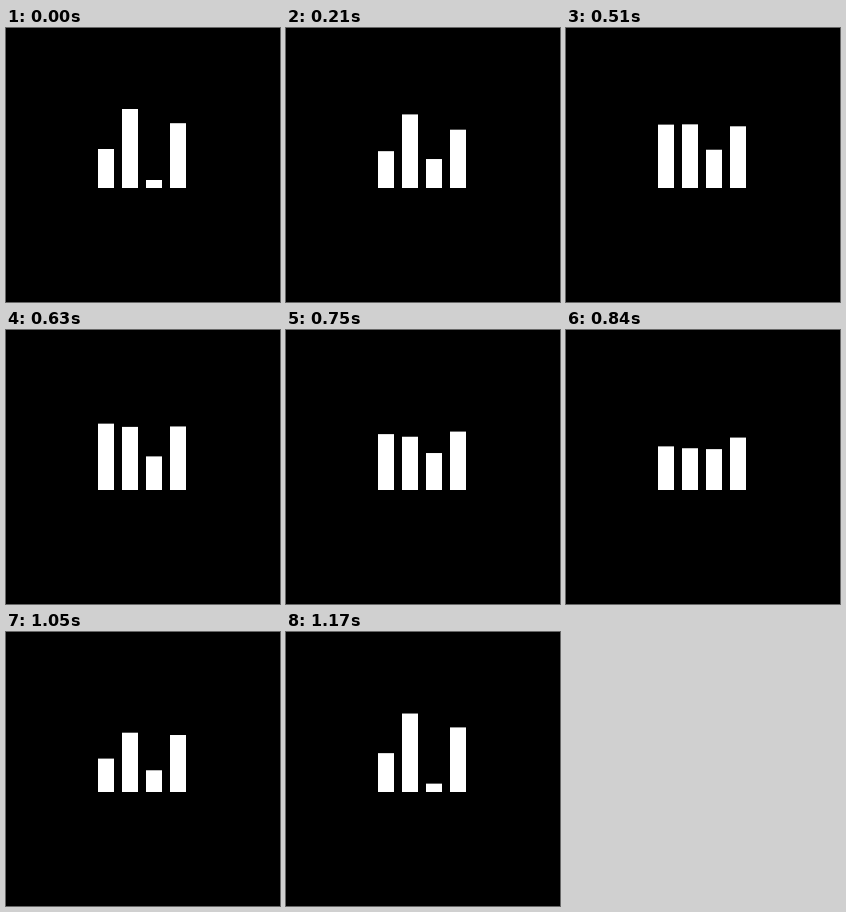
An HTML page with a canvas that plays this animation: 274 by 274 pixels, repeating every 1.2 s.

```html
<!DOCTYPE html>
<html lang="en">
<head>
<meta charset="utf-8">
<title>Equalizer</title>
<style>
  html, body { margin: 0; width: 100%; height: 100%; overflow: hidden; background: #000; }
  canvas { display: block; }
</style>
</head>
<body>
<canvas id="stage" width="274" height="274"></canvas>
<script>
const ctx = document.getElementById('stage').getContext('2d');
const LOOP = 1200, STEP = 30;
const BASE = 160, LEFT = 92, WIDTH = 16, PITCH = 24;

const easeIn = power => u => u ** power;
const easeOut = power => u => 1 - (1 - u) ** power;

// Four poses of the bars; all bars ease together from each pose to the next.
const poses = [
  { at: 0, heights: [39, 79, 8, 64.8], ease: easeIn(2.25) },
  { at: 360, heights: [31.7, 60.8, 78.5, 43], ease: easeOut(2.25) },
  { at: 600, heights: [67.3, 64, 33.3, 64], ease: easeIn(1.55) },
  { at: 960, heights: [22.9, 22.3, 47.5, 42.3], ease: easeOut(2.25) }
];

function heightsAt(t) {
  const i = poses.findLastIndex(pose => pose.at <= t);
  const from = poses[i], to = poses[(i + 1) % poses.length];
  const end = to.at || LOOP;
  const mix = from.ease((t - from.at) / (end - from.at));
  return from.heights.map((h, bar) => h + (to.heights[bar] - h) * mix);
}

function draw(now) {
  const t = Math.floor((now + 0.5) / STEP) * STEP % LOOP;
  ctx.fillStyle = '#000';
  ctx.fillRect(0, 0, 274, 274);
  ctx.fillStyle = '#fff';
  heightsAt(t).forEach((height, bar) => {
    ctx.fillRect(LEFT + bar * PITCH, BASE - height, WIDTH, height);
  });
}

const start = performance.now();
function tick() {
  draw(performance.now() - start);
  requestAnimationFrame(tick);
}
tick();
</script>
</body>
</html>
```
